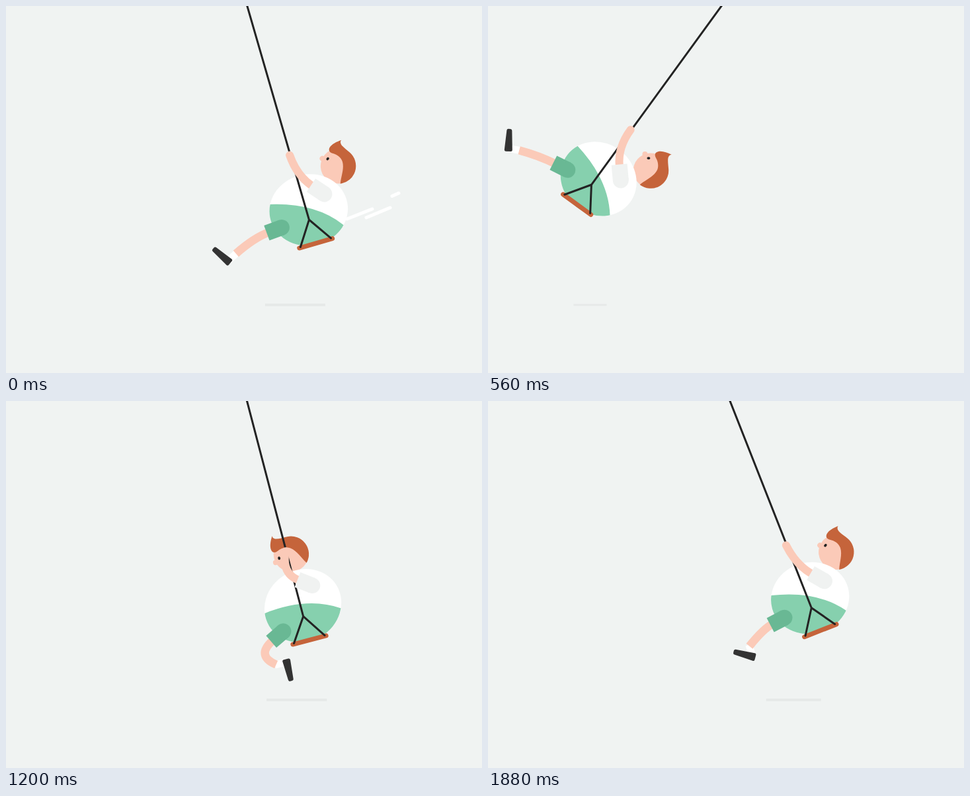
An HTML page for the animation above (1.92 s loop, 720 by 555 pixels).

```html
<!DOCTYPE html>
<html lang="en">
<head>
<meta charset="utf-8">
<title>Swing</title>
<style>
  html, body { margin: 0; width: 100%; height: 100%; overflow: hidden; background: #f0f3f2; }
  svg { display: block; width: 720px; height: 555px; }
  .line { fill: none; }
  .skin { stroke: #fbcab8; }
  .rope { stroke: #232323; stroke-width: 3; stroke-linecap: round; stroke-linejoin: round; }
</style>
</head>
<body>
<svg viewBox="0 0 720 555">
  <defs>
    <clipPath id="belly"><ellipse rx="59.5" ry="54" transform="rotate(-16)"/></clipPath>
  </defs>

  <path id="shadow" class="line" stroke="#e6e9e8"/>
  <g id="streaks" class="line" stroke="#fff" stroke-width="5" stroke-linecap="round">
    <path pathLength="1" d="M554 307 516 322"/>
    <path pathLength="1" d="M581 305 545 320"/>
    <path pathLength="1" d="M594 283 584 287.500"/>
  </g>

  <g id="swing">
    <g id="head">
      <circle r="26.500" fill="#fbcab8"/>
      <circle cx="-25.500" cy="7" r="4" fill="#fbcab8"/>
      <path fill="#c5643b" d="M-22-33C-26-26-29-19-28-13C-27-8-23-7-19-9C-13-12-5-13 1-9C10-3 14 10 20 18A27 27 0 0 0 0-27C-8-27-17-26-20-29Q-22-30-22-33Z"/>
      <ellipse cx="-19" cy="2" rx="1.900" ry="2.500" fill="#222"/>
    </g>

    <g id="torso">
      <g clip-path="url(#belly)">
        <path fill="#fff" d="M-70-70H70V70H-70Z"/>
        <path fill="#86d0ae" d="M-70-2.500-59-3.500Q10-12 55 18.500L70 28V70H-70Z"/>
      </g>
    </g>

    <path id="sock" class="line" stroke="#fff" stroke-width="11"/>
    <path id="shin" class="line skin" stroke-width="12.500"/>
    <path id="shoe" fill="#333" stroke="#333" stroke-width="5" stroke-linejoin="round" d="M-2-3.500 27-1.500V1.500L-2 3.500Z"/>
    <path id="thigh" class="line" stroke="#69b894" stroke-width="24"/>
    <circle id="hip" r="12" fill="#69b894"/>

    <path class="line" stroke="#c5643b" stroke-width="7" stroke-linecap="round" d="M-26 37H26"/>
    <path class="line rope" d="M0-348.500V0M-24 36 0 0 24 36"/>

    <path id="forearm" class="line skin" stroke-width="12" stroke-linecap="round"/>
    <path id="sleeve" class="line" stroke="#f0f2f1" stroke-width="24"/>
    <circle id="shoulder" r="12" fill="#f0f2f1"/>
  </g>
</svg>

<script>
const LOOP = 1920, STEP = 40, ROPE = 348.5, PIVOT = [361.5, -11.5];
const RAD = Math.PI / 180;
const el = Object.fromEntries([...document.querySelectorAll('[id]')].map(e => [e.id, e]));

// time, rope angle
const sway = [
  [0, 16.15], [240, -10.75], [560, -36.05], [650, -38.8], [1040, 0],
  [1120, 7.2], [1360, 28.2], [1620, 41.5], [1680, 40.86], [1880, 21.5]
];

// time, lean, body y, head bearing, head tilt, thigh, shin, shin length,
// knee bend, heel, toe, shadow shift, shadow extra
const poses = [
  [0,    21, -14.4, 50,  57,   4,   17.7, 56, 20, 27,    -57,   -21, 4],
  [240,  21, -14.6, 52,  59,   7,   10,   55, 24, 1,     -63,   4,   0],
  [560,  18, -13.5, 45,  50,   9.5, 16,   55, 24, 26,    -57,   -2,  0],
  [1040, 0,  -17,   0.7, 0,    24,  88,   35, 32, 176,   90,    -1,  0],
  [1360, 0,  -14.4, 4.5, 6,    27,  86,   36, 32, 180,   86,    -19, 3],
  [1680, 4,  -14.4, 33,  25.5, 22,  80,   37, 32, 174.5, 82,    2.5, 0],
  [1880, 22, -14.4, 51,  59.5, 6,   23.7, 45, 12, 84.5,  -36.5, -27, 6]
];

// Periodic monotone cubic through the rows of a track
function sample(rows, t) {
  const n = rows.length;
  const row = i => rows[(i + n) % n];
  const time = i => row(i)[0] + Math.floor(i / n) * LOOP;
  let i = n - 1;
  while (rows[i][0] > t) i--;
  const h = time(i + 1) - time(i), u = (t - time(i)) / h;
  return row(i).slice(1).map((a, k) => {
    const value = j => row(j)[k + 1];
    const slope = j => (value(j + 1) - value(j)) / (time(j + 1) - time(j));
    const tangent = j => {
      const p = slope(j - 1), q = slope(j);
      return p * q > 0 ? 2 * p * q / (p + q) : 0;
    };
    const b = value(i + 1), v = 1 - u;
    return a * (1 + 2 * u) * v * v + b * u * u * (3 - 2 * u)
      + h * u * v * (tangent(i) * v - tangent(i + 1) * u);
  });
}

// Angles of limbs are measured downwards from the left
const reach = ([x, y], angle, len) =>
  [x - len * Math.cos(angle * RAD), y + len * Math.sin(angle * RAD)];
const turn = ([x, y], angle) => {
  const c = Math.cos(angle * RAD), s = Math.sin(angle * RAD);
  return [x * c - y * s, x * s + y * c];
};
const add = (a, b) => [a[0] + b[0], a[1] + b[1]];
const place = (e, [x, y], angle = 0) =>
  e.setAttribute('transform', `translate(${x} ${y}) rotate(${angle})`);
const line = (e, a, b) => e.setAttribute('d', `M${a}L${b}`);
const curve = (e, a, c, b) => e.setAttribute('d', `M${a}Q${c} ${b}`);

function drawArm(shoulder) {
  const hand = [-1, -102];
  const dx = hand[0] - shoulder[0], dy = hand[1] - shoulder[1];
  const slack = Math.max(0, 82.5 - Math.hypot(dx, dy));
  const angle = Math.atan2(dy, -dx) / RAD + 7.5 * Math.sqrt(slack);
  const cuff = reach(shoulder, angle, 24);
  place(el.shoulder, shoulder);
  line(el.sleeve, shoulder, cuff);
  curve(el.forearm, reach(shoulder, angle, 22), reach(cuff, angle, 26), hand);
}

function drawLeg(hip, thigh, shin, len, bend, heelAngle, toe) {
  const knee = reach(hip, thigh, 24);
  const ankle = reach(knee, shin, len);
  const heel = reach(ankle, heelAngle, 16.5);
  place(el.hip, hip);
  line(el.thigh, hip, knee);
  curve(el.shin, reach(hip, thigh, 20), reach(knee, thigh, bend), ankle);
  line(el.sock, reach(ankle, heelAngle, -2), heel);
  place(el.shoe, heel, 180 - toe);
}

function draw(t) {
  const [angle] = sample(sway, t);
  const [lean, bodyY, bearing, tilt, thigh, shin, len, bend, heel, toe, shift, extra] = sample(poses, t);
  const body = [3.5, bodyY];

  el.swing.setAttribute('transform',
    `translate(${PIVOT}) rotate(${-angle}) translate(0 ${ROPE})`);
  place(el.torso, body, lean);
  place(el.head, add(body, turn([0, -80], bearing)), tilt);
  drawArm(add(body, turn([21.5, -26], lean)));
  drawLeg(add(body, turn([-38.5, 30], lean)), thigh, shin, len, bend, heel, toe);

  const x = PIVOT[0] + ROPE * Math.sin(angle * RAD) + shift;
  const w = 117 - 1.86 * Math.abs(angle) + extra;
  line(el.shadow, [x - w / 2, 452], [x + w / 2, 452]);
  el.shadow.setAttribute('stroke-width', Math.min(4, 2 + w / 45));
  el.shadow.setAttribute('opacity', Math.min(1, Math.max(0.4, (w - 32) / 18)));

  const left = 1 - t / 160;
  el.streaks.style.display = left > 0 ? '' : 'none';
  el.streaks.setAttribute('stroke-dasharray', `${Math.max(0, left)} 2`);
}

const start = performance.now();
function tick() {
  const t = (performance.now() - start) % LOOP;
  draw(Math.floor(t / STEP) * STEP);
  requestAnimationFrame(tick);
}
tick();
</script>
</body>
</html>
```
